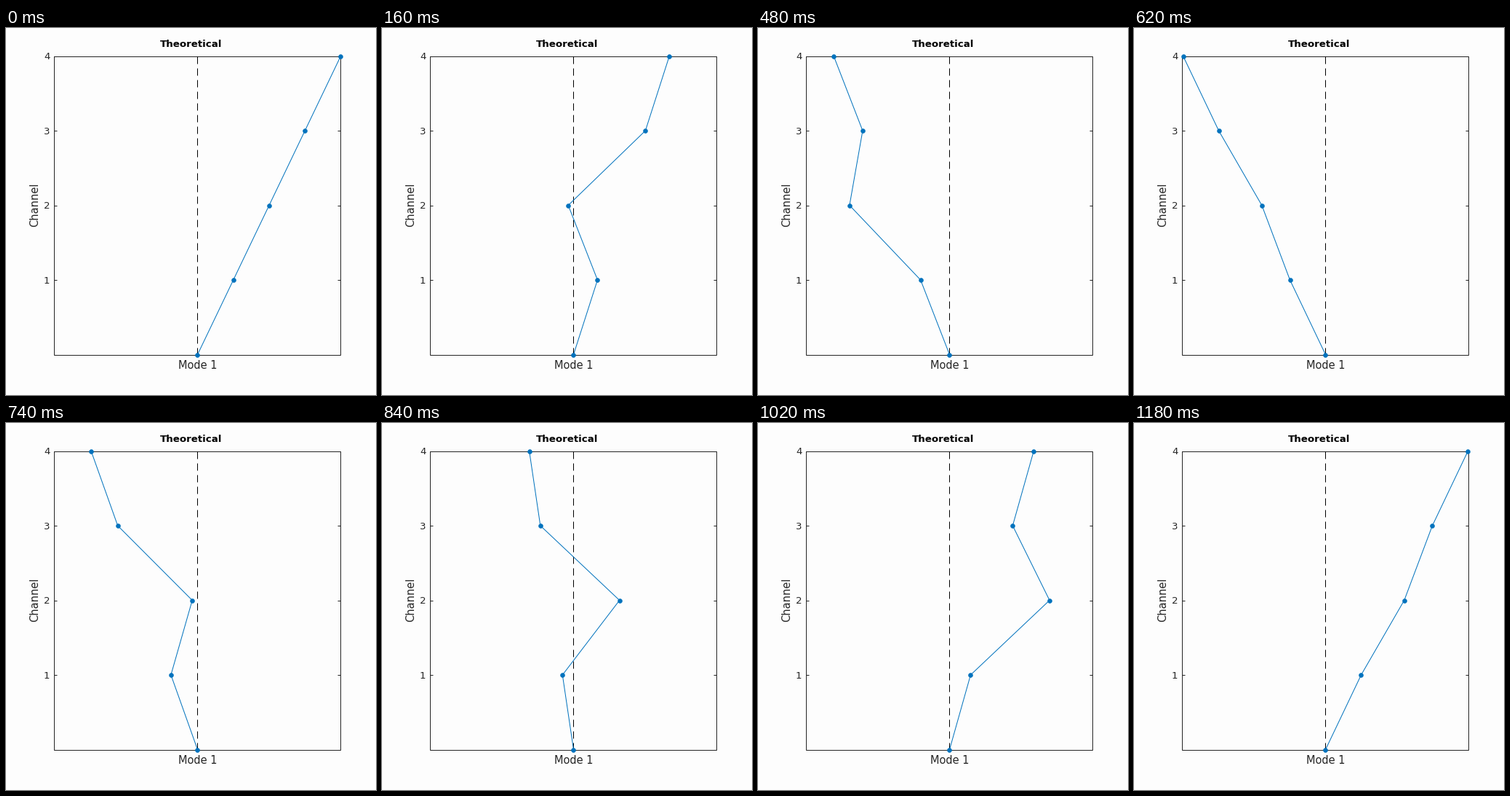
A matplotlib script for the animation above (1.2 s loop, 509x504 px).

```python
import numpy as np
import matplotlib.pyplot as plt
from matplotlib.animation import FuncAnimation

W, H, DPI = 509, 504, 64
PX = 72 / DPI  # points per pixel
FRAMES, INTERVAL = 60, 20

LEFT, RIGHT, TOP, BOTTOM = 66.5, 460.5, 38.5, 448.5
MID = (LEFT + RIGHT) / 2
INK, BLUE, PAPER = "#262626", "#0072bd", "#fdfdfd"

plt.rcParams["font.family"] = "DejaVu Sans"
fig = plt.figure(figsize=(W / DPI, H / DPI), dpi=DPI, facecolor=PAPER)
ax = fig.add_axes([0, 0, 1, 1])
ax.set_xlim(0, W)
ax.set_ylim(H, 0)
ax.axis("off")


def stroke(xs, ys, color=INK, **kw):
    return ax.plot(xs, ys, color=color, lw=PX, solid_capstyle="butt",
                   dash_capstyle="butt", clip_on=False, **kw)[0]


def label(x, y, text, size, color=INK, ha="center", **kw):
    ax.text(x, y, text, fontsize=size * PX, color=color, ha=ha,
            va="baseline", **kw)


channel = np.arange(5)
ys = BOTTOM - channel * (BOTTOM - TOP) / 4

# Frame, ticks and text
stroke([LEFT, RIGHT, RIGHT, LEFT, LEFT], [TOP, TOP, BOTTOM, BOTTOM, TOP],
       solid_joinstyle="miter")
for n in channel[1:]:
    stroke([LEFT, LEFT + 4], [ys[n]] * 2)
    stroke([RIGHT - 4, RIGHT], [ys[n]] * 2)
    label(60.5, ys[n] + 4.7, str(n), 13.33, ha="right")
label(254.3, 26, "Theoretical", 13.33, "black", weight="bold")
label(264, 468, "Mode 1", 14.67)
label(44, 243, "Channel", 14.67, rotation=90, rotation_mode="anchor")

stroke([MID, MID], [BOTTOM, TOP], "black", dashes=(10, 6))
curve = stroke([], [], BLUE, marker="o", markersize=6 * PX,
               markeredgewidth=0.5 * PX, zorder=3)

# Complex mode shape: channel 2 has a quadrature part
shape = channel / 4 + 0j
shape[2] *= 1 + 1j


def draw(i):
    turn = np.exp(2j * np.pi * i / FRAMES)
    curve.set_data(MID + (RIGHT - LEFT) / 2 * (shape * turn).real, ys)
    return [curve]


anim = FuncAnimation(fig, draw, frames=FRAMES, interval=INTERVAL,
                     repeat=True, repeat_delay=0)
plt.show()
```
